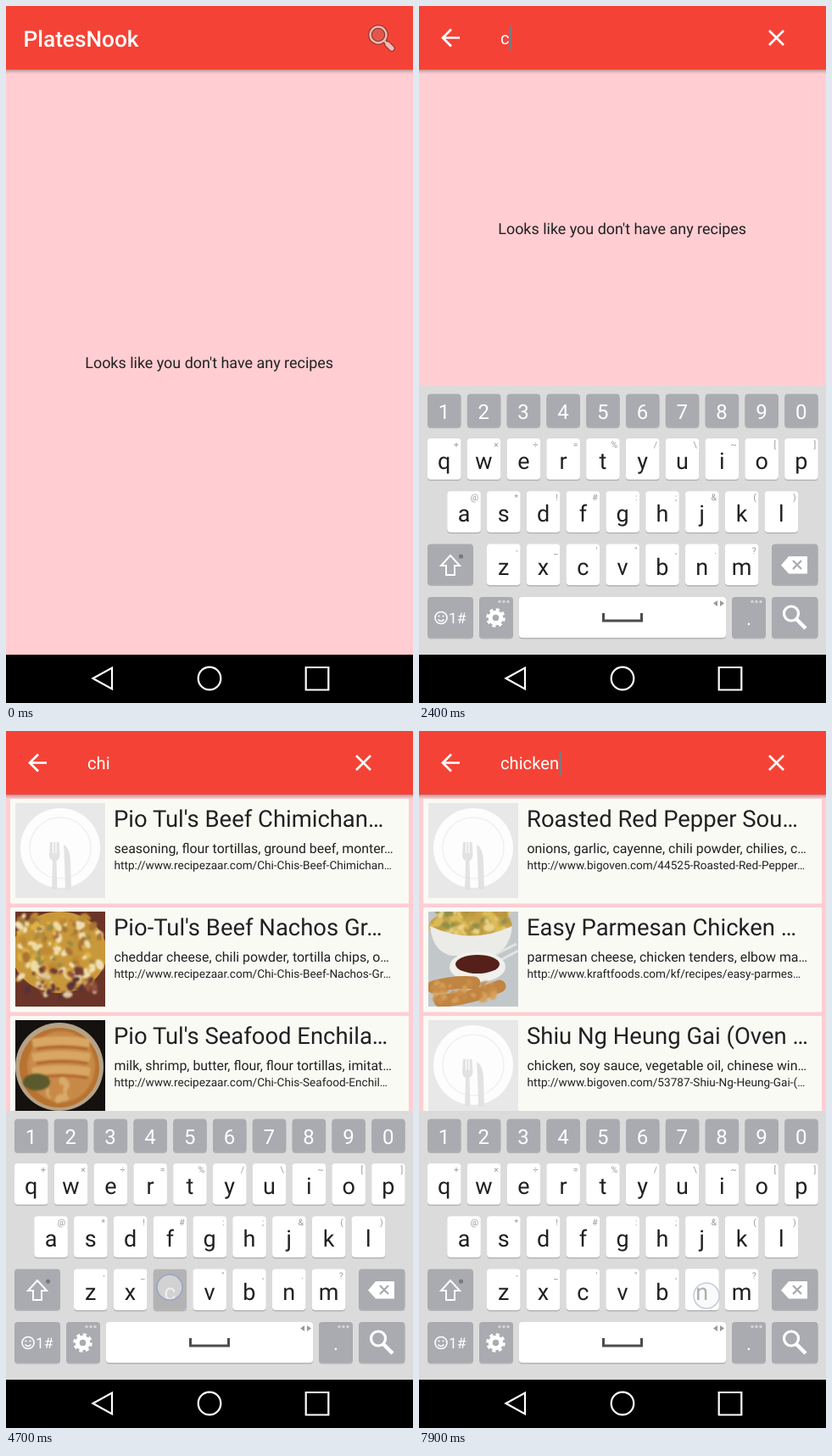
These frames come from a looping animation (480 by 822 pixels, 8 s). An HTML page:

```html
<!DOCTYPE html>
<html lang="en">
<head>
<meta charset="utf-8">
<title>Recipe search</title>
<style>
html, body { margin: 0; width: 100%; height: 100%; overflow: hidden; background: #000; }
svg { display: block; }
text { font-family: Roboto, sans-serif; white-space: pre; text-rendering: geometricPrecision; }
.soft { filter: blur(1.2px); }
</style>
</head>
<body>
<svg id="stage" width="480" height="822"></svg>
<script>
const LOOP = 8000;
const INK = '#212121', RED = '#f44336', GREY = '#a9abb0';

// Drawing helpers, each returning SVG markup
const esc = s => s.replace(/&/g, '&amp;').replace(/</g, '&lt;');
const text = (x, y, s, size, fill = INK, attrs = '') =>
  `<text x="${x}" y="${y}" font-size="${size}" fill="${fill}" ${attrs}>${esc(s)}</text>`;
const mid = 'text-anchor="middle"';
const rect = (x, y, w, h, fill, r = 0) =>
  `<rect x="${x}" y="${y}" width="${w}" height="${h}" rx="${r}" fill="${fill}"/>`;
const oval = (x, y, rx, ry, fill, attrs = '') =>
  `<ellipse cx="${x}" cy="${y}" rx="${rx}" ry="${ry}" fill="${fill}" ${attrs}/>`;
const disc = (x, y, r, fill, attrs) => oval(x, y, r, r, fill, attrs);
const shape = (d, fill) => `<path d="${d}" fill="${fill}"/>`;
const line = (d, color, width, attrs = '') =>
  `<path d="${d}" fill="none" stroke="${color}" stroke-width="${width}" ${attrs}/>`;

// Softly scattered bits of food
function blobs(seed, n, colors, x, y, w, h, size) {
  const rnd = () => (seed = seed * 16807 % 2147483647) / 2147483647;
  let out = '';
  for (let i = 0; i < n; i++) {
    const cx = (x + rnd() * w).toFixed(1), cy = (y + rnd() * h).toFixed(1);
    const r = size * (0.5 + rnd());
    out += oval(cx, cy, r.toFixed(1), (r * 0.65).toFixed(1), colors[i % colors.length],
      `transform="rotate(${Math.round(rnd() * 180)} ${cx} ${cy})"`);
  }
  return `<g class="soft">${out}</g>`;
}

// Thumbnails, 106 x 112
const plate = rect(0, 0, 106, 112, '#e8e8e8') + disc(53, 53, 47, '#fdfdfd') +
  disc(53, 53, 36, 'none', 'stroke="#f0f0f0" stroke-width="1.5"') +
  shape('M41 46h10.5l1 15q0 5-4 7l1 34h-6.5l1-34q-4-2-4-7z', '#e2e2e2') +
  line('M44.6 45v14M48 45v14', '#fdfdfd', 1.3) +
  shape('M57 49q7 4 8 18l1 35h-7l-1-34z', '#e2e2e2');

const photos = {
  steak: rect(0, 0, 106, 112, '#dfe4e4') + oval(50, 58, 58, 54, '#f1f2f0') +
    blobs(7, 30, ['#f4ecdc', '#c2513f', '#e7d8c2'], 55, 18, 34, 35, 5) +
    oval(57, 51, 20, 23, '#6b2a25') + oval(62, 50, 12, 16, '#a5493d') +
    oval(29, 62, 20, 18, '#4b201d') + oval(30, 62, 13, 11, '#9d3d37') +
    blobs(31, 40, ['#39502c', '#cf6d2d', '#23331f', '#7f8a3e'], 38, 74, 52, 24, 5),
  soup: rect(0, 0, 106, 112, '#a9793f') + blobs(9, 24, ['#cfae80', '#8b6236'], 0, 0, 106, 25, 8) +
    disc(52, 57, 53, '#d3a15c') + disc(52, 57, 49, '#d9831d') +
    oval(54, 62, 40, 36, '#e08d23', 'class="soft"') + oval(50, 80, 14, 7, '#eba440', 'class="soft"'),
  nachos: rect(0, 0, 106, 112, '#6a3428') + oval(52, 48, 56, 48, '#c9983a') +
    blobs(15, 130, ['#dfb347', '#efdca4', '#c08a34', '#f0dfb5', '#a87434', '#9a8a45'], 4, 4, 96, 78, 4.5) +
    blobs(21, 45, ['#573038', '#dcc7a0', '#94503a', '#6c3b35'], 14, 68, 80, 32, 4),
  enchilada: rect(0, 0, 106, 112, '#15110f') + disc(52, 55, 52, '#b5a286') + disc(52, 56, 47, '#b9722f') +
    oval(54, 55, 40, 42, '#c78a49', 'class="soft"') +
    '<g class="soft">' + [27, 44, 61].map(y => line(`M20 ${y}q34-6 68 0`, '#d8a763', 10) +
      line(`M25 ${y + 7}q30-5 60 0`, '#ad6029', 2.5)).join('') +
    oval(25, 73, 16, 10, '#5a5a2c') + '</g>' +
    blobs(5, 16, ['#d8ab6a', '#c98947'], 42, 74, 44, 20, 6),
  sandwich: rect(0, 0, 106, 112, '#8d5a52') +
    blobs(3, 30, ['#d8d2d0', '#b05048', '#697797'], 60, 0, 46, 36, 6) +
    oval(38, 62, 62, 52, '#d9dee6') + line('M92 28q18 42-12 80', '#8fa4c4', 10, 'stroke-dasharray="8 7"') +
    oval(14, 18, 30, 21, '#e6c797', 'class="soft"') + oval(44, 58, 36, 40, '#b66c2f', 'class="soft"') +
    blobs(44, 80, ['#bf7434', '#ab5f28', '#c98042'], 14, 26, 62, 66, 5),
  pizza: rect(0, 0, 106, 112, '#9a5a2d') +
    blobs(17, 130, ['#b57a3c', '#8c4726', '#a9602f', '#c1904c', '#7f4a24'], 0, 0, 106, 112, 6) +
    disc(6, 26, 38, '#d3d2c2') + disc(3, 28, 33, '#74853c', 'class="soft"') +
    line('M0 5L45 30M8 0L45 20M0 112L40 60', '#cfb184', 1.6),
  curry: rect(0, 0, 106, 112, '#d8d6cb') + oval(56, 52, 54, 52, '#4a5230') +
    blobs(26, 110, ['#2f3822', '#66703c', '#262d1c', '#a39455', '#c9b97c'], 6, 3, 94, 96, 6) +
    '<g class="soft">' + [[38, 10], [73, 20], [65, 45], [43, 76], [79, 74], [13, 22]].map(([x, y], i) =>
      `<g transform="rotate(${i * 23 - 40} ${x + 9} ${y + 9})">${rect(x, y, 21, 18, i % 2 ? '#dcc678' : '#d0b462', 4)}</g>`).join('') +
    '</g>' + blobs(8, 20, ['#f2efe6', '#dcd6c5'], 0, 84, 34, 24, 6),
  tenders: rect(0, 0, 106, 112, '#c2c8ca') + line('M72 54L104 38M76 62L106 46', '#e0e4e4', 3) +
    oval(50, 17, 49, 20, '#c6a34a') +
    blobs(13, 75, ['#dcbc58', '#e8d288', '#bc963e', '#8f8f48'], 6, -2, 88, 28, 4.5) +
    shape('M2 17Q50 40 99 17Q96 48 72 52H28Q5 48 2 17z', '#ebebe8') +
    oval(58, 65, 33, 18, '#f1f0ed') + oval(58, 62, 26, 11, '#542019') +
    line('M6 89Q30 82 54 84M14 105Q48 104 84 88', '#c08443', 15, 'stroke-linecap="round"') +
    blobs(12, 50, ['#d6a059', '#c98d48'], 6, 82, 72, 24, 3.5)
};

const card = ([photo, title, parts, url], i) => {
  const y = 80 + i * 128;
  return rect(5, y, 470, 123.5, '#fafaf5', 1) +
    `<svg x="11" y="${y + 5}" width="106" height="112">${photos[photo] || plate}</svg>` +
    text(127, y + 33, title, 27.45) + text(127.5, y + 64, parts, 15.9) +
    text(127.5, y + 83, 'http://' + url, 13.6);
};
const cards = rows => rows.map(card).join('');
const unloaded = rows => cards(rows.map(row => ['', ...row.slice(1)]));

const ch = [
  ['', 'Ethiopian Instant  Bread(…', 'baking powder, barley flour, butter, cardamom…', 'www.recipezaar.com/ethiopian-instant-breadc…'],
  ['steak', 'Ch&#226;teaubriand', 'olive oil, kosher salt, red wine, shallot, butter', 'www.epicurious.com/recipes/food/views/Cha…'],
  ['soup', 'Old Hanoi Sweet Potato a…', 'ginger, sugar, sweet potato, water', 'www.recipezaar.com/Old-Hanoi-Sweet-Potato-…']
];
const chi = [
  ['', "Pio Tul's Beef Chimichan…", 'seasoning, flour tortillas, ground beef, monter…', 'www.recipezaar.com/Chi-Chis-Beef-Chimichan…'],
  ['nachos', "Pio-Tul's Beef Nachos Gr…", 'cheddar cheese, chili powder, tortilla chips, o…', 'www.recipezaar.com/Chi-Chis-Beef-Nachos-Gr…'],
  ['enchilada', "Pio Tul's Seafood Enchila…", 'milk, shrimp, butter, flour, flour tortillas, imitat…', 'www.recipezaar.com/Chi-Chis-Seafood-Enchil…']
];
const chick = [
  ['sandwich', 'Kinda Like Roostly-Bo Sa…', 'chicken, eggs, flour, milk, vegetable oil, black …', 'www.recipezaar.com/Kinda-Like-Chick-Fil-A-Sa…'],
  ['pizza', 'White Pizza a la Chick Lit', 'olive oil, garlic, mozzarella cheese', 'allrecipes.com/Recipe/White-Pizza-a-la-Chick-…'],
  ['curry', 'Spinach Chick Pea Curry', 'black pepper, curry paste, basil, garlic powder…', 'allrecipes.com/Recipe/Spinach-Chick-Pea-Curr…']
];
const chicke = [
  ['', 'Roasted Red Pepper Sou…', 'onions, garlic, cayenne, chili powder, chilies, c…', 'www.bigoven.com/44525-Roasted-Red-Pepper…'],
  ['tenders', 'Easy Parmesan Chicken …', 'parmesan cheese, chicken tenders, elbow ma…', 'www.kraftfoods.com/kf/recipes/easy-parmes…'],
  ['', 'Shiu Ng Heung Gai (Oven …', 'chicken, soy sauce, vegetable oil, chinese win…', 'www.bigoven.com/53787-Shiu-Ng-Heung-Gai-(…']
];
const message = y => text(239.7, y, "Looks like you don't have any recipes", 17.95, INK, mid);

// What fills the page from each moment on
const pages = [
  [0, message(427)], [1200, message(268.5)],
  [3000, unloaded(ch)], [3500, cards(ch)],
  [4300, unloaded(chi)], [4400, cards(chi)],
  [6000, unloaded(chick)], [6300, cards(chick)],
  [7100, cards(chicke)]
];

// Keyboard
const keyBox = (x, y, w, h, fill) => rect(x, y + 1.5, w, h, '#b4b4b6', 4) + rect(x, y, w, h, fill, 4);
const letters = {};
const hint = (x, y, s) => text(x, y, s, 10.5, '#9a9a9a', 'text-anchor="end"');
const letterRow = (chars, hints, x0, y) => [...chars].map((c, i) => {
  const x = x0 + i * 46.8;
  letters[c] = { x, y };
  return keyBox(x, y, 39.5, 48.5, '#fff') + text(x + 19.7, y + 36, c, 27, INK, mid) +
    hint(x + 37, y + 11, hints[i]);
}).join('');
const dots = x => [0, 5, 10].map(d => disc(x + d, 702.5, 1.7, '#d4d5d8')).join('');
const gear = disc(90.5, 721.5, 6.3, 'none', 'stroke="#fff" stroke-width="5"') +
  disc(90.5, 721.5, 9.6, 'none', 'stroke="#fff" stroke-width="3.4" stroke-dasharray="4 3.54"');

const keyboard = rect(0, 448, 480, 317, '#dbdbdb') +
  [...'1234567890'].map((c, i) => keyBox(10 + i * 46.8, 457.5, 39.5, 39, GREY) +
    text(29.5 + i * 46.8, 486.5, c, 24, '#fff', mid)).join('') +
  letterRow('qwertyuiop', '+×÷=%/\\~[]', 10, 510) +
  letterRow('asdfghjkl', '@*!#:;&()', 33.3, 572.3) +
  letterRow('zxcvbnm', '-_\'",.?', 80, 634.5) +
  [[10, 634.5, 54], [416, 634.5, 54.5], [10, 697, 54], [71, 697, 40], [369, 697, 40], [416, 697, 54.5]]
    .map(([x, y, w]) => keyBox(x, y, w, 48, GREY)).join('') +
  keyBox(118, 697, 244, 48, '#fff') +
  line('M37 648L26 660H32V671H42V660H48Z', '#fff', 2) + disc(49.5, 649, 2.6, '#77797e') +
  shape('M427 659.5l9-10.5h22v20.5h-22z', '#fff') + line('M441 654l10 10m0-10l-10 10', GREY, 2.3) +
  disc(26, 721.5, 7, 'none', 'stroke="#fff" stroke-width="1.6"') +
  disc(23.5, 719.5, 1.1, '#fff') + disc(28.5, 719.5, 1.1, '#fff') + line('M22.5 723.5q3.5 4 7 0', '#fff', 1.4) +
  text(35, 728, '1#', 17.5, '#fff') + gear + dots(95) + dots(393) +
  line('M217.5 716v9h45v-9', '#4c4c4c', 3) + shape('M352 701v7l-5-3.5zM355 701v7l5-3.5z', '#9a9a9a') +
  text(389, 730, '.', 23, '#fff', mid) +
  disc(439, 716.5, 8.5, 'none', 'stroke="#fff" stroke-width="3.2"') + line('M445 723l11 11', '#fff', 4.5);

const nav = rect(0, 765, 480, 57, '#000') +
  line('M102.5 793L125 780.5V805.5ZM353.7 780H380.3V806.5H353.7Z', '#fff', 2.2) +
  disc(240, 793, 13.3, 'none', 'stroke="#fff" stroke-width="2.2"');

const bar = [0.26, 0.18, 0.12, 0.07, 0.03].map((a, i) => rect(0, 75 + i, 480, 1, `rgba(0,0,0,${a})`)).join('') +
  rect(0, 0, 480, 75, RED);
const glass = (edge, w) => disc(439, 34, 9.5, 'none', `stroke="${edge}" stroke-width="${w}"`) +
  line('M446 41l4 4', edge, w) + line('M450 45l5 5', edge, w + 3, 'stroke-linecap="round"');
const home = text(20.5, 48, 'PlatesNook', 26.2, '#fff', 'font-weight="500"') +
  disc(439, 34, 9, '#e2574c') + glass('#85362f', 4.6) + glass('#f3b9b2', 2.4);
const back = line('M48 37.5H29M38 27.5L28 37.5L38 47.5', '#fff', 2.7);
const clear = line('M413 29l17 17m0-17l-17 17', '#fff', 2.6);

// Each tap: start, letter, touch point; the letter is typed 100 ms later
const taps = [
  [2200, 'c', 193, 658], [2800, 'h', 286, 597], [3800, 'i', 357, 537], [4700, 'c', 193, 656],
  [5700, 'k', 380, 597], [6700, 'e', 124, 535], [7800, 'n', 339, 666]
];
const touch = (x, y, held) => held
  ? disc(x, y, 15, 'rgba(228,228,228,.65)', 'stroke="#95a6c8" stroke-width="1.5"')
  : disc(x, y, 15, 'rgba(244,244,244,.45)', 'stroke="#c3ccd8" stroke-width="1.5"');

function tapView(t) {
  return taps.filter(([at]) => t >= at && t < at + 200).map(([at, c, px, py]) => {
    const { x, y } = letters[c], held = t < at + 100;
    return rect(x, y, 39.5, 48.5, held ? '#b3b3b3' : '#fff', 4) +
      text(x + 19.7, y + 36, c, 27, held ? '#fff' : '#777', mid) + touch(px, py, held);
  }).join('');
}

function searchBar(t) {
  const typed = taps.filter(([at]) => t >= at + 100);
  const query = typed.map(tap => tap[1]).join('');
  const since = t - (typed.length ? typed.at(-1)[0] + 100 : 1000);
  const widths = { c: 10.6, h: 11.1, i: 4.9, k: 10.2, e: 10.7, n: 11.2 };
  const caret = 97.2 + [...query].reduce((sum, c) => sum + widths[c], 0);
  return back + (query ? text(96, 45.3, query, 20.2, '#fff') + clear
    : text(96, 45.3, 'Search recipes', 20.2, '#f9a19a')) +
    (since % 1000 < 500 ? rect(caret - 1.3, 24, 2.6, 28, '#767c83') : '');
}

function view(t) {
  const page = pages.filter(([at]) => t >= at).pop()[1];
  const tapHome = t >= 800 && t < 1000 ? touch(443, 38, t < 900) : '';
  return rect(0, 0, 480, 822, '#ffcdd2') + page + bar +
    (t < 1000 ? home + tapHome : searchBar(t)) +
    (t >= 1300 ? keyboard + tapView(t) : '') + nav;
}

const stage = document.getElementById('stage');
let shown = -1;
function frame() {
  const t = Math.floor(performance.now() % LOOP / 100) * 100;
  if (t !== shown) stage.innerHTML = view(shown = t);
  requestAnimationFrame(frame);
}
frame();
</script>
</body>
</html>
```
